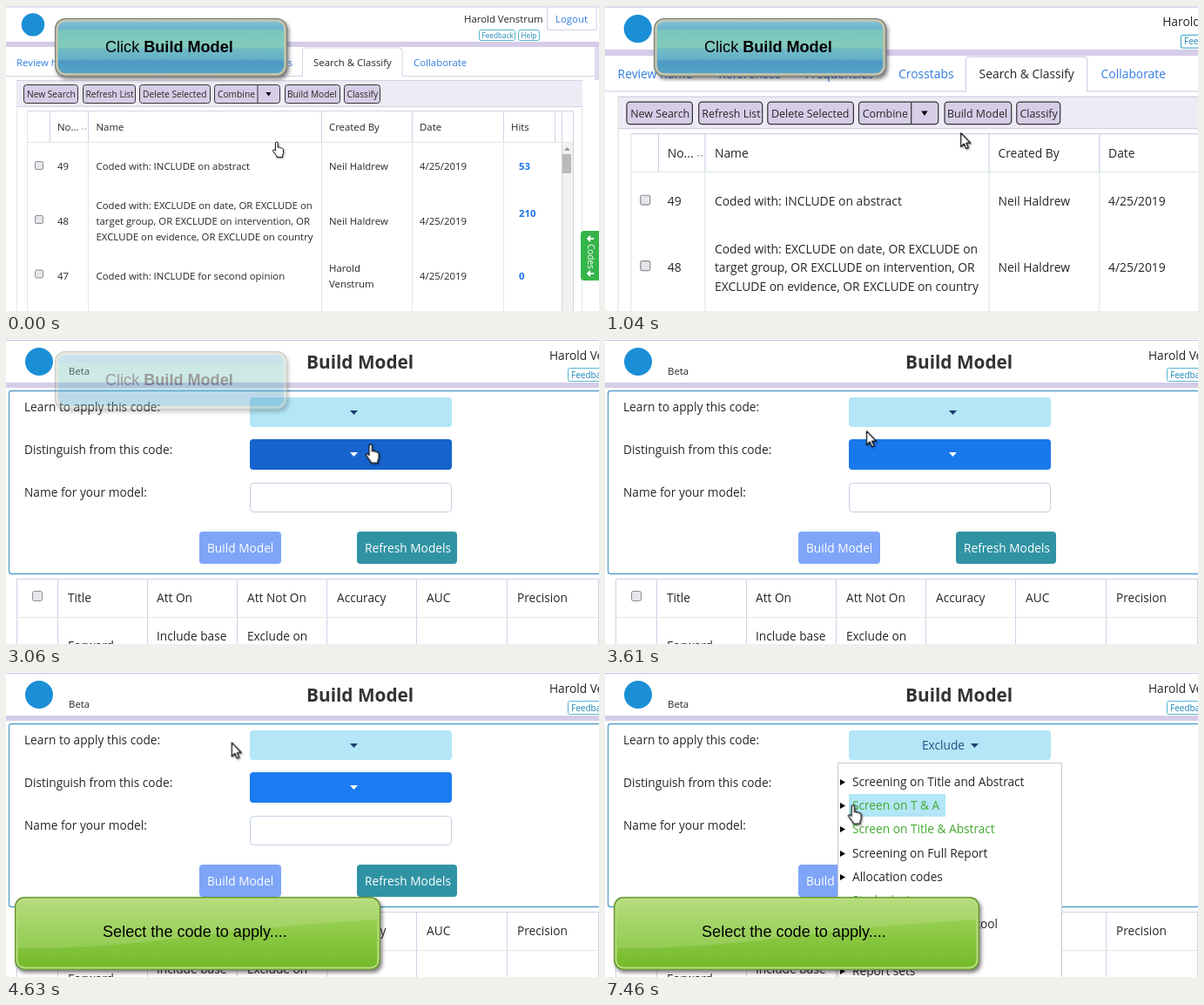
These frames come from a looping animation (681x350 px, 7.99 s). An HTML page:

```html
<!DOCTYPE html>
<html lang="en">
<head>
<meta charset="utf-8">
<title>Build Model walkthrough</title>
<style>
html, body { margin: 0; width: 100%; height: 100%; overflow: hidden; background: #fff; }
svg { display: block; width: 681px; height: 350px; overflow: hidden; }
text { font-family: "Open Sans", "Noto Sans", sans-serif; fill: #262626; white-space: pre; }
.list text { font-size: 11.4px; }
.list .tools text { font-size: 10.2px; }
.form text { font-size: 13.7px; }
.form text.title { font-size: 20.8px; font-weight: bold; fill: #333; }
.form .beta { font-size: 11.4px; }
.list .link { fill: #337de0; }
.list .hits { fill: #1a73e8; font-weight: bold; }
.list .tiny { font-size: 8.2px; fill: #1d86b5; }
.form .tiny { font-size: 10px; fill: #1d86b5; }
.form .white { fill: #fff; }
.form .green { fill: #43a92f; }
.form .pick { fill: #234f86; }
.tools rect { fill: #d6cee7; stroke: #333; rx: 3px; }
.chip { fill: #fff; stroke: #55b4cf; }
.check { fill: #e6e6ea; stroke: #8d8d95; }
.rule { fill: none; stroke: #d6cfe6; }
.pale { fill: none; stroke: #dcebe2; }
.tip text { font: 18.1px "Liberation Sans", Arial, sans-serif; fill: #000; }
.tip .b { font-weight: bold; }
.tip { filter: drop-shadow(2px 3px 2px rgba(0,0,0,.5)); }
.ptr { fill: #fff; stroke: #111; stroke-linejoin: round; filter: drop-shadow(1px 1px 1px rgba(0,0,0,.4)); }

.zoom, .list, .tip, .move, .on, .ptr { animation: 7.99s infinite; }
.list, .on, .ptr { animation-timing-function: step-end; }
.zoom { animation-name: zoom; animation-timing-function: cubic-bezier(.37,0,.63,1); }
.list { animation-name: leave; }
.tip { animation-timing-function: linear; }
.tip1 { animation-name: tip1; }
.tip2 { animation-name: tip2; }
.move { animation-name: move; animation-timing-function: cubic-bezier(.37,0,.63,1); }
.hand { animation-name: hand; }
.arrow { animation-name: arrow; }
.beam { animation-name: beam; }
.menu { animation-name: menu; }
.row1 { animation-name: row1; }
.row2 { animation-name: row2; }
.empty { animation-name: empty; }
.chosen { animation-name: chosen; }
.tools .model { animation: model 7.99s infinite step-end; }
.tools .label { animation: label 7.99s infinite step-end; }
.ring { animation: ring 7.99s infinite linear; }
.blue { animation: blue 7.99s infinite linear; }

@keyframes zoom { 0%, 2.503% { transform: scale(1); } 8.01%, 100% { transform: scale(1.217); } }
@keyframes leave { 0% { visibility: visible; } 31.539%, 100% { visibility: hidden; } }
@keyframes tip1 { 0%, 31.539% { opacity: 1; } 42.553%, 100% { opacity: 0; } }
@keyframes tip2 { 0%, 46.058% { opacity: 0; } 57.071%, 100% { opacity: 1; } }
@keyframes move {
  0%, 7.009% { transform: translate(311px,156px); }
  16.771%, 22.52% { transform: translate(347.5px,102.7px); }
  22.528%, 41.302% { transform: translate(344.3px,99.4px); }
  50.438%, 52.566% { transform: translate(90.4px,66.6px); }
  63.204%, 74.718% { transform: translate(330.3px,66.6px); }
  86.108%, 100% { transform: translate(234.2px,125.7px); }
}
@keyframes hand {
  0% { visibility: visible; } 12.64% { visibility: hidden; }
  13.767% { visibility: visible; } 43.6% { visibility: hidden; }
  58.4%, 100% { visibility: visible; }
}
@keyframes arrow {
  0% { visibility: hidden; } 12.64% { visibility: visible; }
  13.767% { visibility: hidden; } 43.6% { visibility: visible; }
  47.6% { visibility: hidden; } 55.95% { visibility: visible; }
  58.4%, 100% { visibility: hidden; }
}
@keyframes beam { 0% { visibility: hidden; } 47.6% { visibility: visible; } 55.95%, 100% { visibility: hidden; } }
@keyframes menu { 0% { opacity: 0; } 68.21%, 100% { opacity: 1; } }
@keyframes row1 { 0% { opacity: 0; } 80.1% { opacity: 1; } 82.929%, 100% { opacity: 0; } }
@keyframes row2 { 0% { opacity: 0; } 82.929%, 100% { opacity: 1; } }
@keyframes empty { 0% { opacity: 1; } 91.114%, 100% { opacity: 0; } }
@keyframes chosen { 0% { opacity: 0; } 91.114%, 100% { opacity: 1; } }
@keyframes model {
  0% { fill: #d6cee7; stroke: #333; } 13.767% { fill: #b7b7b7; stroke: #555; }
  27.534%, 100% { fill: #b9b9b9; stroke: #b9b9b9; }
}
@keyframes label { 0% { fill: #262626; } 27.534%, 100% { fill: #555; } }
@keyframes ring { 0%, 68.21% { opacity: 0; } 70.088%, 91.114% { opacity: 1; } 92.991%, 100% { opacity: 0; } }
@keyframes blue { 0%, 43.6% { fill: #1663ce; } 45.5%, 100% { fill: #1a7cf0; } }
</style>
</head>
<body>
<svg viewBox="0 0 681 350">
  <defs>
    <linearGradient id="sea" x2="0" y2="1">
      <stop offset="0" stop-color="#86c3d6"/><stop offset=".14" stop-color="#6db3cd"/>
      <stop offset=".2" stop-color="#7bc5c0"/><stop offset=".48" stop-color="#83cbbb"/>
      <stop offset=".54" stop-color="#6fb9c6"/><stop offset=".7" stop-color="#68b2c9"/>
      <stop offset=".76" stop-color="#4c9ac3"/><stop offset="1" stop-color="#5aa5c6"/>
    </linearGradient>
    <linearGradient id="leaf" x2="0" y2="1">
      <stop offset="0" stop-color="#a9d666"/><stop offset=".5" stop-color="#8cc944"/>
      <stop offset="1" stop-color="#74b92c"/>
    </linearGradient>
  </defs>

  <!-- model form -->
  <g class="form">
    <rect width="681" height="350" fill="#fff"/>
    <path d="M0 1.5H681" stroke="#cbbfe0"/>
    <rect y="50" width="681" height="6" fill="#d5cde8"/>
    <circle cx="38" cy="26" r="16" fill="#1b8fd6"/>
    <text class="beta" x="72" y="41">Beta</text>
    <text class="title" x="345" y="34">Build Model</text>
    <text x="624" y="23.500">Harold Venstrum</text>
    <rect class="chip" x="645.500" y="33.500" width="50" height="15" rx="2"/>
    <text class="tiny" x="649" y="45">Feedback</text>

    <rect x="3.500" y="59.500" width="700" height="210" rx="3" fill="#fff" stroke="#559fcd" stroke-width="1.300"/>
    <text x="21" y="83">Learn to apply this code:</text>
    <text x="21" y="132">Distinguish from this code:</text>
    <text x="21" y="181">Name for your model:</text>
    <rect class="ring" x="277" y="64" width="238" height="40" rx="6" fill="#b6e7f6"/>
    <rect x="280" y="67" width="232" height="34" rx="4" fill="#b3e6f6"/>
    <path class="on empty" d="M395 82h9l-4.500 5z" fill="#1f3e6e"/>
    <g class="on chosen">
      <text class="pick" x="364" y="89">Exclude</text>
      <path d="M420 82h9l-4.500 5z" fill="#1f3e6e"/>
    </g>
    <rect class="blue" x="280" y="115" width="232" height="35" rx="4"/>
    <path d="M395 130h9l-4.500 5z" fill="#fff"/>
    <rect x="280.500" y="165.500" width="231" height="33" rx="4" fill="#fff" stroke="#c3cfe0"/>
    <rect x="222" y="221" width="94" height="37" rx="4" fill="#7ea5f8"/>
    <text class="white" x="231" y="245">Build Model</text>
    <rect x="403" y="221" width="115" height="37" rx="4" fill="#2f93a4"/>
    <text class="white" x="412" y="245">Refresh Models</text>

    <path class="rule" d="M12 275.500H681M12.500 275V350M59.500 275V350M162.500 275V350M265.500 275V350M368.500 275V350M471.500 275V350M575.500 275V350M680.500 275V350"/>
    <path class="pale" d="M12 319.500H681"/>
    <rect class="check" x="30.500" y="289.500" width="11" height="11" rx="2"/>
    <text x="71" y="302">Title</text>
    <text x="173" y="302">Att On</text>
    <text x="277" y="302">Att Not On</text>
    <text x="380" y="302">Accuracy</text>
    <text x="483" y="302">AUC</text>
    <text x="587" y="302">Precision</text>
    <text x="71" y="357">Forward</text>
    <text x="173" y="346">Include base</text>
    <text x="277" y="346">Exclude on</text>

    <g class="on menu">
      <rect x="267.500" y="104.500" width="257" height="260" fill="#fff" stroke="#c9c9cf"/>
      <rect class="on row1" x="280" y="113" width="207" height="26" fill="#b3e6f6"/>
      <rect class="on row2" x="280" y="140" width="111" height="26" fill="#b3e6f6"/>
      <path d="M270 123v7l6-3.500zm0 27v7l6-3.500zm0 27v7l6-3.500zm0 28v7l6-3.500zm0 27v7l6-3.500zm0 108v7l6-3.500z"/>
      <text x="284" y="131">Screening on Title and Abstract</text>
      <text class="green" x="284" y="158">Screen on T &amp; A</text>
      <text class="green" x="284" y="185">Screen on Title &amp; Abstract</text>
      <text x="284" y="213">Screening on Full Report</text>
      <text x="284" y="240">Allocation codes</text>
      <text class="green" x="284" y="267">Study design</text>
      <text x="451" y="294" text-anchor="end">Quality appraisal tool</text>
      <text x="284" y="348">Report sets</text>
    </g>
  </g>

  <!-- search list -->
  <g class="list">
    <rect width="681" height="350" fill="#fff"/>
    <g class="zoom">
      <path d="M0 1H681" stroke="#cbbfe0"/>
      <circle cx="31" cy="21.400" r="13.200" fill="#1b8fd6"/>
      <text x="526" y="19">Harold Venstrum</text>
      <path class="rule" d="M621.500 2V27.500H678V2"/>
      <text class="link" x="631" y="19">Logout</text>
      <rect class="chip" x="543.500" y="27.500" width="41" height="12" rx="2"/>
      <text class="tiny" x="546.500" y="36.500">Feedback</text>
      <rect class="chip" x="588.500" y="27.500" width="24" height="12" rx="2"/>
      <text class="tiny" x="591.500" y="36.500">Help</text>
      <rect y="41" width="681" height="6" fill="#d5cde8"/>
      <rect x="676" y="47" width="5" height="38" fill="#e0d9ee"/>

      <path class="rule" d="M0 80.500H340.500V51q0-3 3-3H452q3 0 3 3V80.500H676"/>
      <text class="link" x="12" y="68.500">Review home</text>
      <text class="link" x="107" y="68.500">References</text>
      <text class="link" x="189" y="68.500">Frequencies</text>
      <text class="link" x="277" y="68.500">Crosstabs</text>
      <text x="353" y="68.500">Search &amp; Classify</text>
      <text class="link" x="468" y="68.500">Collaborate</text>

      <rect x="12" y="85" width="650" height="30" fill="#efebf6"/>
      <path class="rule" d="M12 85.500H662M12 115.500H662"/>
      <path class="pale" d="M12.500 86V350M661.500 117V350"/>
      <g class="tools">
        <rect x="20.500" y="90.500" width="62" height="21"/>
        <text x="24" y="105">New Search</text>
        <rect x="88.500" y="90.500" width="60" height="21"/>
        <text x="91.500" y="105">Refresh List</text>
        <rect x="153.500" y="90.500" width="81" height="21"/>
        <text x="157" y="105">Delete Selected</text>
        <rect x="239.500" y="90.500" width="75" height="21"/>
        <path d="M289 91V111" stroke="#333"/>
        <text x="243" y="105">Combine</text>
        <path d="M298.500 99h6l-3 4.500z"/>
        <rect class="model" x="320.500" y="90.500" width="63" height="21"/>
        <text class="label" x="323" y="105">Build Model</text>
        <rect x="388.500" y="90.500" width="41" height="21"/>
        <text x="391.500" y="105">Classify</text>
      </g>

      <path class="rule" d="M24 120.500H651M50.500 120V157M94.500 120V157M362.500 120V157M466.500 120V157M571.500 120V157M630.500 120V157M638.500 120V350M651.500 120V350"/>
      <path class="pale" d="M24 156.500H651M24.500 120V350M94.500 157V350M362.500 157V350M466.500 157V350M571.500 157V350"/>
      <text x="59" y="143">No...</text>
      <path d="M87 141h1.500m2 0h1.500" stroke="#8a8aa0"/>
      <text x="103.500" y="143">Name</text>
      <text x="371" y="143">Created By</text>
      <text x="475" y="143">Date</text>
      <text x="580" y="143">Hits</text>
      <rect x="639" y="157" width="12" height="193" fill="#f1f1f1"/>
      <path d="M641 166h7l-3.500-4z" fill="#999"/>
      <rect x="639" y="170" width="10" height="22" fill="#bababa"/>

      <rect class="check" x="33.500" y="178.500" width="9" height="9" rx="1.500"/>
      <text x="59" y="188">49</text>
      <text x="103.500" y="188">Coded with: INCLUDE on abstract</text>
      <text x="371" y="188">Neil Haldrew</text>
      <text x="475" y="188">4/25/2019</text>
      <text class="hits" x="589" y="188">53</text>

      <rect class="check" x="33.500" y="240.500" width="9" height="9" rx="1.500"/>
      <text x="59" y="251">48</text>
      <text x="103.500" y="233">Coded with: EXCLUDE on date, OR EXCLUDE on</text>
      <text x="103.500" y="251">target group, OR EXCLUDE on intervention, OR</text>
      <text x="103.500" y="269">EXCLUDE on evidence, OR EXCLUDE on country</text>
      <text x="371" y="251">Neil Haldrew</text>
      <text x="475" y="251">4/25/2019</text>
      <text class="hits" x="589" y="242">210</text>

      <rect class="check" x="33.500" y="303" width="9" height="9" rx="1.500"/>
      <text x="59" y="313.500">47</text>
      <text x="103.500" y="313.500">Coded with: INCLUDE for second opinion</text>
      <text x="371" y="304.500">Harold</text>
      <text x="371" y="322.500">Venstrum</text>
      <text x="475" y="313.500">4/25/2019</text>
      <text class="hits" x="589" y="313.500">0</text>

      <path d="M681 258H664q-4 0-4 4V311q0 4 4 4H681z" fill="#35b44a"/>
      <text transform="translate(667.500 273) rotate(90)" style="fill:#fff;font-size:10px">Codes</text>
      <path d="M675 267h-7m3-3l-3 3 3 3M675 307h-7m3-3l-3 3 3 3" fill="none" stroke="#fff" stroke-width="1.800"/>
    </g>
  </g>

  <!-- callouts -->
  <g class="tip tip1">
    <rect x="56" y="14" width="267" height="67" rx="12" fill="#77827f"/>
    <rect x="58.500" y="16.500" width="262" height="62" rx="10" fill="url(#sea)" stroke="#c9c6ac" stroke-width="2.500"/>
    <text x="114" y="52.500">Click <tspan class="b">Build Model</tspan></text>
  </g>
  <g class="tip tip2">
    <rect x="10" y="258" width="420" height="84" rx="11" fill="#6d9a35"/>
    <rect x="12.500" y="260.500" width="415" height="79" rx="9" fill="url(#leaf)" stroke="#b9df80" stroke-width="2"/>
    <path d="M14 268q0-7 8-7H418q8 0 8 7V284Q300 292 200 305T14 317z" fill="#fff" opacity=".14"/>
    <text x="111" y="304">Select the code to apply....</text>
  </g>

  <!-- pointer -->
  <g class="zoom"><g class="move">
    <path class="ptr hand" d="M-1.600 1.400a1.400 1.400 0 0 1 2.800 0V6.400c.9-.8 2-.5 2.400.5 1-.6 2-.2 2.300.7 1.200-.2 1.600.6 1.600 1.600v3.300c0 1.200-1 2-1 3.200V17.500H-.1v-1.400c-1-1.500-2.800-3.600-4.200-5.600-.7-1.200.6-2.200 1.700-1.300l1 1z"/>
    <path class="ptr arrow" d="M0 0V13l3-2.800 2 4.600 2-.9-2-4.400h4z"/>
    <path class="ptr beam" style="fill:none" d="M-2.500-6h2l.5.5.5-.5h2M0-5.500V5.500M-2.500 6h2l.5-.5.5.5h2"/>
  </g></g>
</svg>
</body>
</html>
```
